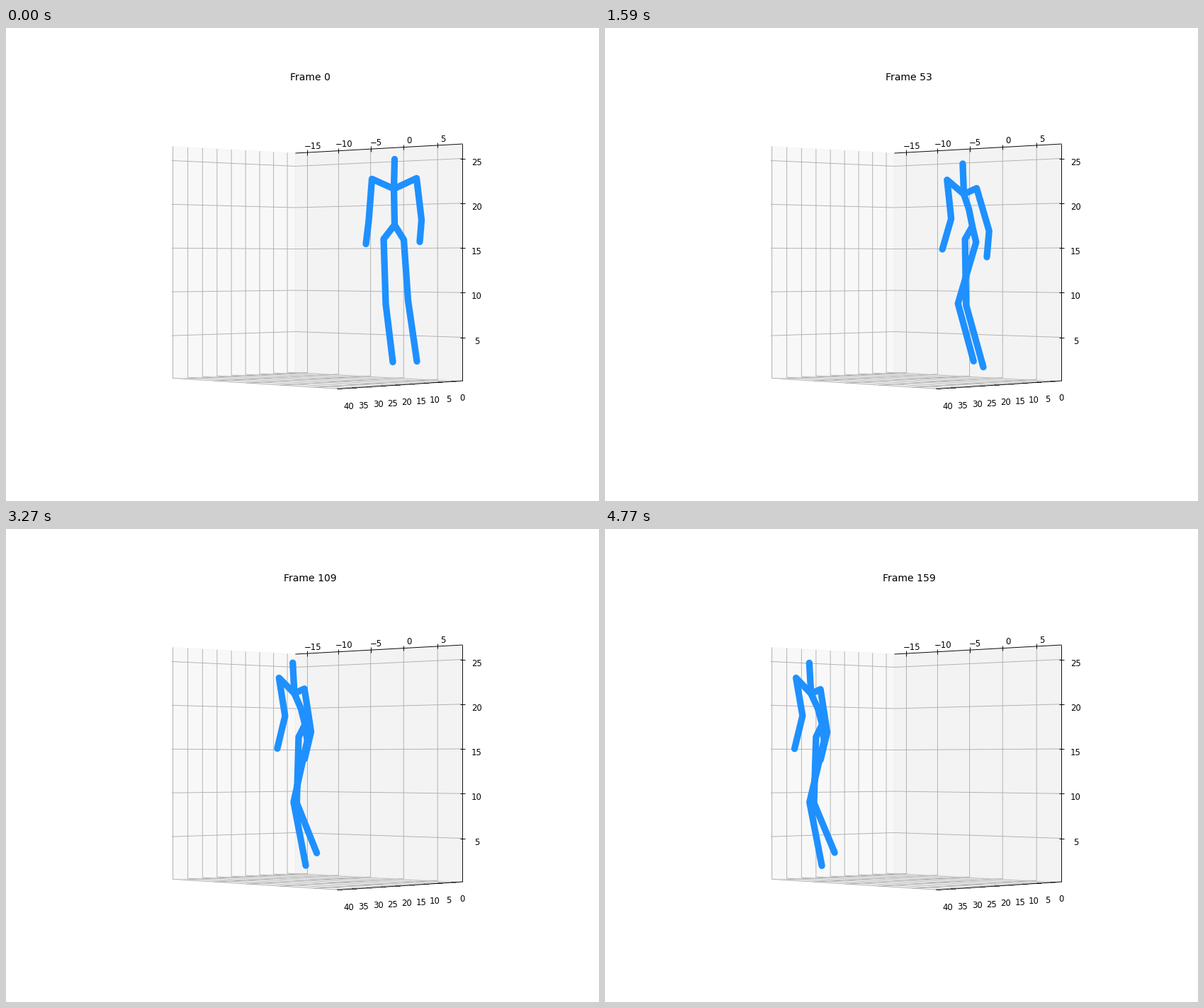
These frames come from a looping animation (837x669 px, 4800 ms). A matplotlib script:

```python
import math
import numpy as np
import matplotlib.pyplot as plt
from matplotlib.animation import FuncAnimation

W, H, DPI = 837, 669, 96
FRAMES, INTERVAL = 160, 30
PX = 72 / DPI  # points per pixel
GRID = "#b0b0b0"
HAIR = 0.93 * PX

plt.rcParams["font.family"] = "DejaVu Sans"
fig = plt.figure(figsize=(W / DPI, H / DPI), dpi=DPI, facecolor="white")
ax = fig.add_axes([0, 0, 1, 1])
# whole numbers are pixel centres
ax.set_xlim(-0.5, W - 0.5)
ax.set_ylim(H - 0.5, -0.5)
ax.axis("off")


def line(points, color, width=HAIR, z=2):
    xs, ys = zip(*points)
    ax.plot(xs, ys, color=color, lw=width, zorder=z, solid_capstyle="butt")


def label(x, y, text, size=11.625):
    return ax.text(x, y, text, fontsize=size * PX, ha="center", va="baseline")


def on_edge(a, b, x):
    """Point at x on the straight edge from a to b."""
    return x, a[1] + (b[1] - a[1]) * (x - a[0]) / (b[0] - a[0])


# --- the box: left wall, right wall and floor ---
left_top, back_top, right_top = (233.5, 167), (408, 176.5), (644, 163.5)
left_low, back_low, right_low = (234, 494.8), (408, 486), (644, 498.5)
front_low = (468, 510)

panes = [
    ([left_top, back_top, back_low, left_low], 0.95),
    ([back_top, right_top, right_low, back_low], 0.914),
    ([left_low, back_low, right_low, front_low], 0.925),
]
for corners, grey in panes:
    ax.fill(*zip(*corners), fc=(grey,) * 3, ec=(grey,) * 3, lw=PX,
            alpha=0.5, zorder=1)

for edge in ([back_top, right_top], [front_low, right_low],
             [right_top, right_low]):
    line(edge, "black", z=3)

# width axis, labelled along the top
for i, value in enumerate(range(-15, 10, 5)):
    x = 425 + 43.2 * i + 0.68 * i * i
    top = on_edge(back_top, right_top, x)
    low = on_edge(back_low, right_low, x)
    line([top, low, on_edge(left_low, front_low, x - 175)], GRID)
    line([(x, top[1] - 4), (x, top[1] + 3.5)], "black", z=3)
    label(x + 8, top[1] - 5.3, str(value).replace("-", "\u2212"))

# depth axis, labelled along the bottom
for i, value in enumerate(range(40, -5, -5)):
    x = 235.2 + 21.05 * i - 0.11 * i * i
    low = on_edge(left_low, back_low, x)
    end = on_edge(front_low, right_low, x + 235)
    line([on_edge(left_top, back_top, x), low, end], GRID)
    line([(end[0] - 3.5, end[1] - 0.25), (end[0] + 3.5, end[1] + 0.25)],
         "black", z=3)
    label(end[0] + 13 - 0.1 * i, end[1] + 29 - 0.2 * i, str(value))

# height axis, labelled on the right
for i, value in enumerate(range(25, 0, -5)):
    y = 184 + 63.25 * i
    line([(233.5, 187 + 61.9 * i), (408, 195 + 58.5 * i), (644, y)], GRID)
    line([(640.5, y), (647.5, y)], "black", z=3)
    label(664, y + 9.2, str(value))

# --- the walker ---
# bone: parent, vector when standing face on, vector when walking side on
BONES = {
    "chest": ("pelvis", (-0.5, -26), (-6.3, -23)),
    "neck": ("pelvis", (-1, -51), (-16, -43.5)),
    "head": ("neck", (1, -42), (-2.5, -43.5)),
    "l_shoulder": ("neck", (-31, -14), (-21, -22.5)),
    "l_elbow": ("l_shoulder", (-4.5, 59), (9.5, 53.5)),
    "l_hand": ("l_elbow", (-4, 33), (-11.5, 47)),
    "r_shoulder": ("neck", (32, -15), (13, -6)),
    "r_elbow": ("r_shoulder", (7, 59), (9.5, 61)),
    "r_hand": ("r_elbow", (-2.5, 31), (-9.5, 39)),
    "l_hip": ("pelvis", (-15.5, 20), (-8.5, 17.5)),
    "l_knee": ("l_hip", (3, 92), (-3, 93.5)),
    "l_ankle": ("l_knee", (10, 82), (29.5, 70)),
    "r_hip": ("pelvis", (13, 21), (2.5, 23)),
    "r_knee": ("r_hip", (6, 86), (-21, 87)),
    "r_ankle": ("r_knee", (12.5, 86), (17.5, 90)),
}
# how far a bone swings sideways with the cosine and sine of the gait
SWING = {
    "neck": (0, 4),
    "r_elbow": (-6, -6),
    "r_hand": (-3, -2),
    "l_hand": (2, 2),
    "l_knee": (-2, -12),
    "l_ankle": (0, -12),
    "r_knee": (8, 19),
    "r_ankle": (-4, 0),
}
LIFT = {"l_ankle": -10, "r_ankle": 5}      # foreshortening of a raised shin
RISE = {"neck": -0.6, "l_ankle": 1, "r_ankle": 1}  # stretch as the hips rise

CHAINS = [
    "head neck chest pelvis",
    "l_hand l_elbow l_shoulder neck r_shoulder r_elbow r_hand",
    "l_ankle l_knee l_hip pelvis r_hip r_knee r_ankle",
]

# hip path as time, x, y
path = np.array([(0, 548, 278), (23, 555, 282), (53, 518, 280),
                 (75, 498, 277), (109, 421.5, 276), (128, 368, 276),
                 (159, 306, 276)], float)
times, places = path[:, 0], path[:, 1:]
speeds = np.gradient(places, times, axis=0)
# moments at which one foot, then the other, is lifted
steps = [23, 53, 75, 92, 109, 144, 159]


def hips(t):
    """Smooth cubic path through the key places."""
    i = min(np.searchsorted(times, t, side="right") - 1, len(times) - 2)
    span = times[i + 1] - times[i]
    u = (t - times[i]) / span
    v = 1 - u
    return (v * v * ((1 + 2 * u) * places[i] + u * span * speeds[i])
            + u * u * ((3 - 2 * u) * places[i + 1] - v * span * speeds[i + 1]))


def pose(t):
    turn = 1 - math.exp(-t / 40)
    phase = math.pi * np.interp(t, steps, range(len(steps)))
    c, s = math.cos(phase) - 1, math.sin(phase)
    rise = 7 * turn * s * s
    joints = {"pelvis": hips(t) - (0, rise)}
    for name, (parent, front, side) in BONES.items():
        bone = (1 - turn) * np.array(front) + turn * np.array(side)
        a, b = SWING.get(name, (0, 0))
        bone[0] += turn * (a * c + b * s)
        bone[1] += turn * LIFT.get(name, 0) * c + rise * RISE.get(name, 0)
        joints[name] = joints[parent] + bone
    return joints


limbs = [ax.plot([], [], color="dodgerblue", lw=9.3 * PX, zorder=5,
                 solid_capstyle="round", solid_joinstyle="round")[0]
         for _ in CHAINS]
title = label(428.5, 73.6, "", 13.95)


def draw(n):
    joints = pose(n)
    for limb, chain in zip(limbs, CHAINS):
        limb.set_data(*zip(*(joints[name] for name in chain.split())))
    title.set_text(f"Frame {n}")
    return [*limbs, title]


anim = FuncAnimation(fig, draw, frames=FRAMES, interval=INTERVAL,
                     repeat=True, repeat_delay=0, blit=False)
plt.show()
```
